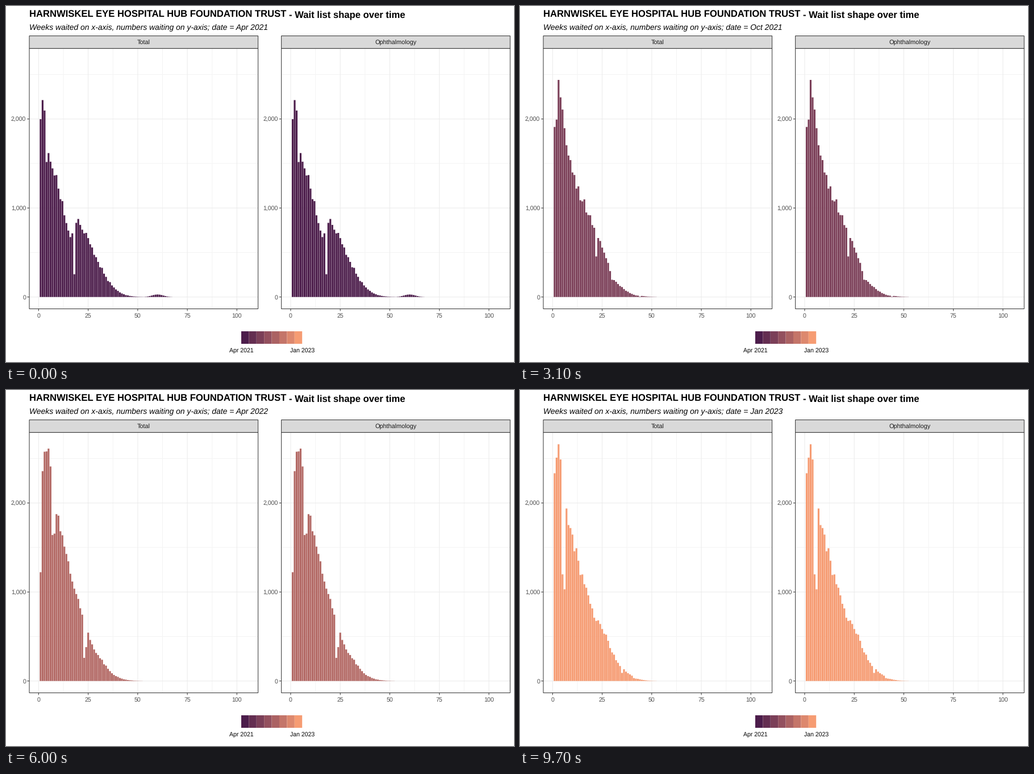
A matplotlib script that plays this animation: 894x626 px, repeating every 10 s.

```python
import numpy as np
import matplotlib.pyplot as plt
from matplotlib.animation import FuncAnimation
from matplotlib.collections import PolyCollection
from matplotlib.patches import Rectangle

W, H, DPI = 894, 626, 64
STEP, UNIT, BASE = 3.489, 0.1565, 511.7   # px per week, px per patient, zero line
PEAK, LAST = 2660, 105
NAMES = "Jan Feb Mar Apr May Jun Jul Aug Sep Oct Nov Dec".split()
MONTHS = [m for m in range(22) if m != 8]
CHANGES = np.array([*range(5, 81, 5), *range(84, 97, 4)])

# share of a week's arrivals still waiting, by weeks waited
SHARE = {1: .8, 3: 1, 5: .95, 8: .78, 12: .6, 16: .46, 20: .35, 24: .25,
         28: .155, 32: .1, 36: .05, 40: .022, 46: .004, 52: .0005}
# weekly arrivals, by weeks since the first date
LEVEL = {-28: 3200, -20: 2450, -16: 1500, -9: 1850, -4: 1620, -2: 2500, 8: 2350,
         14: 2050, 24: 2300, 42: 2650, 52: 2700, 58: 2400, 64: 2800, 70: 2200,
         76: 2500, 83: 2250, 90: 2850}
# weeks with holidays bring fewer arrivals
HOLIDAYS = {-18: .34, 4: .64, 33: .63, 34: .37, 49: .76, 50: .73, 56: .61,
            85: .48, 86: .52}

rng = np.random.default_rng(4)
NOISE = dict(zip(range(-60, 95), 1 + .03 * rng.standard_normal(155)))


def curve(points, x):
    return np.exp(np.interp(x, list(points), np.log(list(points.values()))))


def waiting(month):
    """Patients by weeks waited: each week's arrivals age and thin out."""
    now = round(4.348 * month)
    bars = np.zeros(LAST + 1)
    for w in range(1, 53):
        week = now - w
        arrivals = curve(LEVEL, week) * HOLIDAYS.get(week, 1) * NOISE[week]
        bars[w] = min(arrivals * curve(SHARE, w), PEAK)
    # a small old backlog that is cleared within the first months
    old = np.arange(LAST + 1) - 60 - now
    return bars + 28 * np.exp(-(old / 4) ** 2 - now / 3)


# colour ramp, mixed in CIE Lab
TO_XYZ = np.array([[.4124, .3576, .1805], [.2126, .7152, .0722], [.0193, .1192, .9505]])
WHITE = TO_XYZ.sum(axis=1)
TO_LAB = np.array([[0, 116, 0], [500, -500, 0], [0, 200, -200]])


def to_lab(rgb):
    c = np.array(rgb) / 255
    lin = np.where(c > .04045, ((c + .055) / 1.055) ** 2.4, c / 12.92)
    t = TO_XYZ @ lin / WHITE
    return TO_LAB @ np.where(t > .008856, np.cbrt(t), 7.787 * t + 16 / 116)


LOW, HIGH = to_lab((76, 29, 75)), to_lab((246, 156, 115))


def ramp(p):
    t = np.linalg.solve(TO_LAB, LOW + (HIGH - LOW) * p)
    xyz = np.where(t > .2069, t ** 3, (t - 16 / 116) / 7.787) * WHITE
    lin = np.clip(np.linalg.solve(TO_XYZ, xyz), 0, 1)
    return np.where(lin > .0031308, 1.055 * lin ** (1 / 2.4) - .055, 12.92 * lin)


plt.rcParams["font.family"] = "Liberation Sans"
plt.rcParams["text.hinting"] = "none"
fig = plt.figure(figsize=(W / DPI, H / DPI), dpi=DPI, facecolor="white")
ax = fig.add_axes([0, 0, 1, 1])
ax.set_xlim(0, W)
ax.set_ylim(H, 0)
ax.axis("off")


def text(x, y, s, px, color="black", ha="left", **kw):
    return ax.text(x, y, s, fontsize=px * 72 / DPI, color=color, ha=ha,
                   va="baseline", **kw)


def line(xs, ys, color, z=1):
    ax.plot(xs, ys, color=color, lw=72 / DPI, zorder=z,
            solid_capstyle="butt", snap=False)


def box(x0, y0, x1, y1, z, fill="none", edge="none"):
    ax.add_patch(Rectangle((x0, y0), x1 - x0, y1 - y0, facecolor=fill,
                           edgecolor=edge, lw=72 / DPI, zorder=z, snap=False))


INK, GREY, MAJOR, MINOR = "#333333", "#4D4D4D", "#EBEBEB", "#F4F4F4"
PANELS = {"Total": 57.4, "Ophthalmology": 501.0}
STRIP = 52.5
TOP, BOTTOM = BASE - 1.05 * PEAK * UNIT, BASE + .05 * PEAK * UNIT

for title, x0 in PANELS.items():
    left, right = x0 - 4.695 * STEP, x0 + 110.695 * STEP
    for v in range(500, 2501, 1000):
        line([left, right], [BASE - v * UNIT] * 2, MINOR)
    for w in np.arange(12.5, 100, 25):
        line([x0 + w * STEP] * 2, [TOP, BOTTOM], MINOR)
    for v in (0, 1000, 2000):
        y = BASE - v * UNIT
        line([left, right], [y, y], MAJOR, 2)
        line([left - 3.8, left], [y, y], INK, 2)
        text(left - 6, y + 4, f"{v:,}", 10.5, GREY, "right")
    for w in range(0, 101, 25):
        x = x0 + w * STEP
        line([x, x], [TOP, BOTTOM], MAJOR, 2)
        line([x, x], [BOTTOM, BOTTOM + 3.8], INK, 2)
        text(x, 547.6, str(w), 10.5, GREY, "center")
    box(left, TOP, right, BOTTOM, 5, edge=INK)
    box(left, STRIP, right, TOP, 5, "#D9D9D9", INK)
    text((left + right) / 2, 67.5, title, 10.9, "#1A1A1A", "center", zorder=6)

text(41, 20, "HARNWISKEL EYE HOSPITAL HUB FOUNDATION TRUST", 16.6, weight="bold")
text(702.5, 20, "- Wait list shape over time", 16.6, ha="right", weight="bold")
subtitle = text(41, 42, "", 13.89, style="italic")

for i in range(8):
    box(414 + i * 13.4, 572, 414 + (i + 1) * 13.4, 594, 3, ramp(i / 7))
text(414, 609, "Apr 2021", 10.5, ha="center")
text(521.2, 609, "Jan 2023", 10.5, ha="center")

bars = PolyCollection([], linewidths=0, zorder=4, snap=False)
ax.add_collection(bars, autolim=False)


def columns(month):
    quads = []
    for x0 in PANELS.values():
        for w, v in enumerate(waiting(month)):
            if v >= 1:
                a, b = x0 + (w - .45) * STEP, x0 + (w + .45) * STEP
                y = BASE - v * UNIT
                quads.append([(a, BASE), (a, y), (b, y), (b, BASE)])
    return quads


SHAPES = {m: columns(m) for m in MONTHS}


def draw(frame):
    # bars jump first, the date follows one frame later
    month = MONTHS[np.sum(frame >= CHANGES)]
    bars.set_verts(SHAPES[month])
    bars.set_facecolor(ramp(month / 21))
    year, m = divmod(MONTHS[np.sum(frame > CHANGES)] + 3, 12)
    subtitle.set_text("Weeks waited on x-axis, numbers waiting on y-axis; "
                      f"date = {NAMES[m]} {2021 + year}")
    return bars, subtitle


anim = FuncAnimation(fig, draw, frames=100, interval=100, repeat=True,
                     repeat_delay=0, init_func=lambda: draw(0))
plt.show()
```
